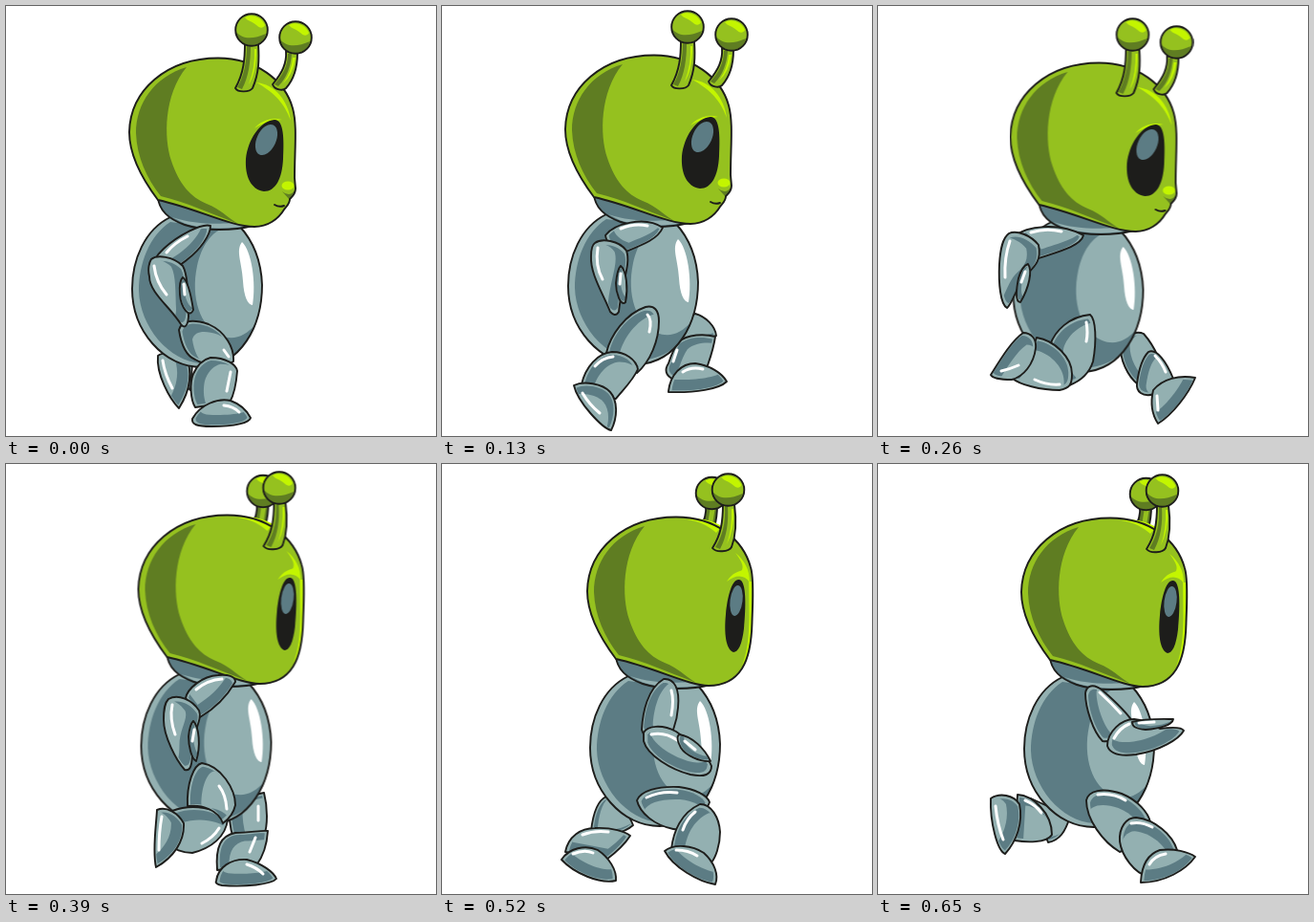
An HTML page that plays this animation: 450 px wide and 450 px high, repeating every 780 ms.

```html
<!DOCTYPE html>
<html lang="en">
<head>
<meta charset="utf-8">
<title>Walking alien</title>
<style>
html, body { margin: 0; width: 100%; height: 100%; overflow: hidden; background: #fff; }
svg { display: block; width: 100vw; height: 100vh; }
.ink { stroke: #1d1d1b; stroke-width: 1.9; stroke-linejoin: round; stroke-linecap: round; }
.none { fill: none; }
.green { fill: #95c11f; }
.moss { fill: #5f7d22; }
.lime { fill: #c3f500; }
.steel { fill: #93b0b1; }
.slate { fill: #5c7c84; }
.black { fill: #1d1d1b; }
.white { fill: #fff; }
.gloss { fill: none; stroke: #fff; stroke-width: 3; stroke-linecap: round; }
.pose { visibility: hidden; animation: pose 780ms step-end calc((var(--i) - 6) * 130ms) infinite; }
.face { visibility: hidden; animation: face 780ms step-end calc((var(--i) - 2) * 390ms) infinite; }
.bob { animation: bob 780ms step-end infinite; }
@keyframes pose { 0% { visibility: visible; } 16.6667%, 100% { visibility: hidden; } }
@keyframes face { 0% { visibility: visible; } 50%, 100% { visibility: hidden; } }
@keyframes bob {
  0%, 100% { transform: translate(0, 0); }
  16.6667% { transform: translate(0, -3px); }
  33.3333% { transform: translate(9.5px, 5px); }
  50% { transform: translate(9.5px, -1px); }
  66.6667% { transform: translate(23px, 1px); }
  83.3333% { transform: translate(21px, 2px); }
}
</style>
</head>
<body>
<svg viewBox="0 0 450 450">
  <defs>
    <g id="ball">
      <circle r="16.8" class="green"/>
      <path class="moss" d="M-16 2C-10 10 2 10 15 4C13 13 6 16 0 16C-8 16 -15 10 -16 2Z"/>
      <path class="lime" d="M-7 -13C0 -17 10 -14 14 -5C12 -1 8 -2 5 -5C1 -9 -4 -9 -7 -13Z"/>
      <circle r="16.8" class="ink none"/>
    </g>
    <path id="skull" d="M159 203C147 187 129 160 129 132C130 88 168 54.500 222 54.500C262 54.500 292 78 300 107C305 125 302 150 302 180L303 191C303 197 299 200 297 202C297 207 294 209 291 213C285 223 274 231 260 231C235 231 200 212 159 203Z"/>
    <path id="skull2" d="M159 203C147 187 129 160 129 132C130 88 168 54.500 222 54.500C264 54.500 292 78 300 107C304 120 302 145 301.500 165C301 185 298 202 291 213C284 224 272 231 256 231C235 231 200 212 159 203Z"/>
    <path id="shade" class="moss" d="M189 64C155 74 136 102 136 133C137 158 147 180 162 199C190 206 212 216 243 228C230 220 225 213 210 207C193 200 181 186 173 162C165 138 165 93 189 64Z"/>
  </defs>

  <g id="far">
    <g class="pose" style="--i:0">
      <path d="M176 340L197 345L193 402L182 392Z"/>
      <path d="M159 366C163 362 183 362 188 365C196 384 193 402 181 421C171 411 157 385 159 366Z" data-s="-11 -3" data-g="M164 371Q166 385 174 400"/>
    </g>
    <g class="pose" style="--i:1">
      <path d="M238 335L265 322C276 325 286 335 287 345C275 350 255 350 245 355Z"/>
      <path d="M247 352C257 343 275 343 286 346C284 360 280 370 277 379L243 391C233 387 233 380 237 374C240 365 243 358 247 352Z" data-s="8 5" data-g="M246 360L242 372"/>
      <path d="M237 403C239 386 250 374 265 374C280 376 293 384 298 393C290 401 265 405 237 404Z" data-s="2 -11" data-g="M252 383Q261 377 273 380"/>
    </g>
    <g class="pose" style="--i:2">
      <path d="M254 352C262 342 272 340 278 343C286 352 290 360 293 367C285 375 278 385 272 396C262 388 252 370 254 352Z" data-s="7 -3"/>
      <path d="M283 362C292 358 302 373 309 390L290 406C276 410 270 403 271 395C273 380 277 368 283 362Z" data-s="7 3" data-g="M290 366Q297 373 301 383"/>
      <path d="M288 402C298 390 315 386 332 389C325 406 308 428 293 437C287 428 285 415 288 402Z" data-s="-7 -7" data-g="M292 408L293 423"/>
    </g>
    <g class="pose" style="--i:3">
      <path d="M234 352L270 344C274 360 274 378 270 389L238 392C234 380 233 364 234 352Z" data-s="11 0" data-g="M264 358L264 373"/>
      <path d="M221 425C219 400 225 389 240 386C255 386 268 383 274 384C273 400 268 412 262 420Z" data-s="9 6" data-g="M261 391L255 406"/>
      <path d="M220 436C222 422 235 413 252 414C268 418 280 427 283 434C278 440 250 443 226 441C220 440 219 438 220 436Z" data-s="3 -11" data-g="M252 419Q262 422 269 429"/>
    </g>
    <g class="pose" style="--i:4">
      <path d="M156 384C158 366 163 352 172 348C185 355 195 365 200 378C190 387 170 390 156 390Z"/>
      <path d="M129 406C132 390 145 381 160 381C178 380 192 385 197 389C190 400 180 408 172 414Z" data-s="3 -9" data-g="M147 388Q160 383 174 385"/>
      <path d="M125 414C133 402 150 398 163 404C175 412 183 425 182 436C165 440 138 428 125 414Z" data-s="4 -10" data-g="M137 408Q149 403 158 407"/>
    </g>
    <g class="pose" style="--i:5">
      <path d="M160 350L201 369C196 385 190 394 178 396Z"/>
      <path d="M146 346C162 347 182 365 182 388C176 397 155 396 143 394Z" data-s="6 8" data-g="M154 352Q164 356 171 365"/>
      <path d="M118 350C127 344 142 346 148 356C152 375 145 395 133 408C125 405 117 375 118 350Z" data-s="-12 -3" data-g="M123 358Q125 378 131 393"/>
    </g>
  </g>

  <g class="bob">
    <path class="steel" d="M172 221C145 234 132 266 132 296C132 340 165 378 205 378C246 376 268 335 268 292C267 265 258 245 244 230Z"/>
    <path class="slate" d="M172 226C150 240 139 270 139 298C140 335 170 372 205 374C232 373 252 359 262 332C250 347 237 350 225 345C203 336 193 305 200 272C205 250 215 238 226 233Z"/>
    <path class="white" d="M247 247C257 256 262 290 258 313C253 313 249 304 248 288C247 268 240 256 247 247Z"/>
    <path class="ink none" d="M172 221C145 234 132 266 132 296C132 340 165 378 205 378C246 376 268 335 268 292C267 265 258 245 244 230"/>
    <path class="slate ink" d="M159 200C160 214 170 223 187 229C208 236 240 235 258 230L240 205Z"/>
    <path class="steel" d="M174 221C200 230 232 228 246 226L253 230C235 233.500 208 234 187 227.500Z"/>

    <g class="face" style="--i:0">
      <use href="#skull" class="green"/>
      <use href="#shade"/>
      <path class="lime" d="M262 80C281 82 295 98 298 120C291 101 281 91 262 80Z"/>
      <path class="lime" d="M260 128C267 120 278 116 289 119C278 120 269 122 260 128Z"/>
      <path class="black" d="M281 119C291 119 291 140 290 160C289 181 282 194 270 194C256 192 250 178 251 160C253 140 266 120 281 119Z"/>
      <ellipse class="slate" cx="272.500" cy="140" rx="10" ry="17" transform="rotate(25 272.500 140)"/>
      <path class="moss" d="M289 194Q297 201 303 192L297 203Z"/>
      <ellipse class="lime" cx="295" cy="188" rx="6.500" ry="4.500"/>
      <use href="#skull" class="ink none"/>
      <path class="ink none" d="M281 208Q286 211 291 209"/>
      <path class="green ink" d="M293 47C294 60 289 70 279 82C281 88 290 89 293 86C302 76 305 62 305 49Z"/>
      <path class="moss" d="M295 50C295 63 289 73 281 82L285 84C294 75 298 63 299 50Z"/>
      <path class="lime" d="M300 54Q299 68 290 81Q300 73 303 54Z"/>
      <use href="#ball" x="303" y="33"/>
      <path class="green ink" d="M250 38C250 55 249 70 240 86C243 91 255 90 258 86C265 70 265 55 264 40Z"/>
      <path class="moss" d="M252 42C252 58 249 74 242 85L247 87C254 74 256 58 256 42Z"/>
      <path class="lime" d="M260 45Q261 64 254 82Q262 70 262 45Z"/>
      <use href="#ball" x="257" y="25"/>
    </g>

    <g class="face" style="--i:1">
      <path class="moss ink" d="M253 42C254 52 251 58 248 65L262 65C265 55 265 50 265 42Z"/>
      <path class="green" d="M258 44L255 62L260 62L263 44Z"/>
      <use href="#ball" x="259.500" y="29.500"/>
      <use href="#skull2" class="green"/>
      <use href="#shade"/>
      <path class="lime" d="M233 57C248 59 257 65 264 71L270 64C258 57 245 55 233 57Z"/>
      <path class="lime" d="M275 122C281 112 288 112 291 110C293 105 290 100 284 92C294 100 299 110 299 123C293 114 284 115 275 122Z"/>
      <path class="lime" d="M298 122L301 122L300.500 165C300 185 297 200 291 210C297 195 298 180 298.500 160Z"/>
      <path class="black" d="M288 120C296 121 295 150 293 171C291 188 287 196 282 196C274 193 272 176 274 156C276 135 281 119 288 120Z"/>
      <ellipse class="slate" cx="285" cy="142" rx="6.500" ry="16" transform="rotate(7 285 142)"/>
      <use href="#skull2" class="ink none"/>
      <path class="green ink" d="M271 40C271 60 269 73 260 87C264 92 277 91 280 86C285 73 285 56 283 41Z"/>
      <path class="moss" d="M273 43C274 62 270 75 263 86L268 88C275 75 277 60 276 43Z"/>
      <path class="lime" d="M280 46Q281 66 275 83Q283 68 282 46Z"/>
      <use href="#ball" x="276.500" y="26"/>
    </g>
  </g>

  <g id="near">
    <g class="pose" style="--i:0">
      <path d="M181 339C184 328 197 328 212 333C230 341 239 358 238 372C228 379 208 376 198 370C188 366 183 352 181 339Z" data-s="10 8" data-g="M228 360L233 367"/>
      <path d="M214 368C230 368 241 375 242 382C241 395 238 408 234 415L198 420C193 412 192 395 196 385C200 376 206 370 214 368Z" data-s="10 3" data-g="M235 383L231 403"/>
      <path d="M195 432C203 417 222 410 235 413C246 417 253 425 256 431C255 436 240 440 215 440C200 440 194 438 195 432Z" data-s="4 -10" data-g="M228 418Q238 419 244 425"/>
      <path d="M214 230C205 227 180 240 165 254C153 265 150 275 153 285C165 280 180 274 190 265C203 255 214 240 214 230Z" data-s="-4 -8" data-g="M190 241Q176 248 168 258"/>
      <path d="M152 265C158 260 175 262 185 272C191 283 190 305 191 325C190 337 186 337 183 333C172 315 150 300 150 283C148 275 150 268 152 265Z" data-s="-10 -3" data-g="M155 272Q157 289 168 302"/>
      <path d="M185 284C191 288 194 305 196 318C192 328 183 315 182 302C181 290 183 286 185 284Z" data-g="M186 291L187 302"/>
    </g>
    <g class="pose" style="--i:1">
      <path d="M172 363C176 345 192 322 213 315C222 313 227 318 227 330C227 350 218 372 204 384C195 378 185 370 172 363Z" data-s="10 3" data-g="M215 323Q220 328 217 341"/>
      <path d="M146 396C150 378 163 363 178 362C192 362 203 370 205 380C200 392 188 403 182 411C175 412 160 402 146 396Z" data-s="8 7" data-g="M160 377Q168 368 179 367"/>
      <path d="M138 397C148 392 168 395 176 404C184 413 184 430 177 444C168 442 142 415 138 397Z" data-s="-5 8" data-g="M147 405Q154 417 165 426"/>
      <path d="M171 240C180 228 212 219 231 232C226 244 210 250 190 258C180 255 172 248 171 240Z" data-s="4 -8" data-g="M187 233Q201 227 215 230"/>
      <path d="M160 248C167 243 185 245 193 256C198 270 188 290 185 320C182 325 179 323 176 320C168 300 155 280 156 262C156 255 157 250 160 248Z" data-s="-10 -3" data-g="M163 253Q160 272 168 286"/>
      <path d="M187 272C193 277 195 295 192 310C187 315 182 300 182 290C183 280 185 274 187 272Z" data-g="M187 280L186 291"/>
    </g>
    <g class="pose" style="--i:2">
      <path d="M180 355C185 340 200 325 222 323C228 328 229 350 225 372C220 388 208 394 200 397C190 385 177 372 180 355Z" data-s="11 2" data-g="M218 331Q220 342 218 351"/>
      <path d="M166 347C185 350 203 368 203 385C203 396 201 400 190 402C170 402 148 396 141 390C155 377 160 365 166 347Z" data-s="-4 9" data-g="M164 391Q177 397 190 396"/>
      <path d="M118 386C128 370 140 350 152 342C160 342 166 348 165 358C163 375 152 388 140 391C130 391 120 390 118 386Z" data-s="5 9" data-g="M129 382Q138 380 147 376"/>
      <path d="M143 241C155 230 190 226 215 240C212 252 185 258 165 265Z" data-s="4 -8" data-g="M160 237Q176 232 192 236"/>
      <path d="M137 238C145 234 160 240 168 250C172 270 160 275 152 285C145 295 140 312 135 316C128 312 126 290 127 270C128 255 130 243 137 238Z" data-s="-10 0" data-g="M138 246Q132 263 133 284"/>
      <path d="M157 270C162 277 158 295 149 310C143 310 145 295 147 285C150 275 154 271 157 270Z" data-g="M154 278L150 289"/>
    </g>
    <g class="pose" style="--i:3">
      <path d="M174 363C195 355 222 360 232 372C230 390 215 402 195 407C185 407 175 403 170 398Z" data-s="6 10" data-g="M205 397Q217 391 223 381"/>
      <path d="M190 358C189 335 196 315 205 313C225 316 240 340 240 357C238 366 234 371 227 376C222 362 205 356 190 358Z" data-s="11 4" data-g="M223 337Q230 346 231 361"/>
      <path d="M158 362C168 358 180 365 186 376C187 395 175 412 157 422C153 405 157 380 158 362Z" data-s="-11 -3" data-g="M163 369Q160 385 160 404"/>
      <path d="M188 245C190 235 205 222 222 221C232 220 240 222 240 228C230 245 215 258 203 265Z" data-s="-4 -10" data-g="M199 236Q211 226 226 225"/>
      <path d="M170 246C180 240 195 247 202 258C206 268 195 280 195 300C195 315 193 322 187 320C178 310 165 285 165 268C165 256 166 250 170 246Z" data-s="-12 -3" data-g="M174 252Q171 267 177 283"/>
      <path d="M196 269C202 275 204 295 199 311C194 308 191 295 191 285C192 276 194 271 196 269Z" data-g="M197 278L195 290"/>
    </g>
    <g class="pose" style="--i:4">
      <path d="M204 352C208 342 225 337 248 338C265 340 278 347 280 354C275 368 258 385 242 382C222 378 207 365 204 352Z" data-s="2 10" data-g="M214 349Q229 342 246 344"/>
      <path d="M240 403C242 385 250 365 270 356C282 356 290 370 291 385C291 400 286 412 282 417C270 410 255 402 240 403Z" data-s="10 5" data-g="M252 383Q256 371 265 364"/>
      <path d="M233 405C243 397 262 399 274 407C285 417 290 430 286 440C268 437 242 422 233 405Z" data-s="4 -10" data-g="M245 404Q258 404 267 410"/>
      <path d="M209 278C210 260 215 235 232 225C243 224 249 235 247 255C246 270 240 285 235 292C222 295 212 288 209 278Z" data-s="9 -2" data-g="M240 237Q243 247 240 263"/>
      <path d="M211 281C215 274 230 272 245 280C262 292 278 305 282 316C282 325 275 328 260 325C240 320 215 305 211 290Z" data-s="2 -10" data-g="M219 283Q233 280 246 289"/>
      <path d="M248 283C262 285 275 298 281 311C270 312 255 305 250 297C246 290 246 285 248 283Z" data-g="M254 290L265 299"/>
    </g>
    <g class="pose" style="--i:5">
      <path d="M218 352C220 342 235 338 255 345C272 352 283 365 285 375C275 390 262 403 253 406C235 395 218 372 218 352Z" data-s="-3 11" data-g="M230 346Q246 344 259 352"/>
      <path d="M253 395C252 380 260 370 270 370C290 372 308 388 313 404L283 432C268 428 255 410 253 395Z" data-s="-3 10" data-g="M265 376Q276 374 287 380"/>
      <path d="M275 437C276 420 283 408 295 404C310 402 325 406 332 411C322 425 300 438 275 438Z" data-s="1 -11" data-g="M284 419Q289 410 301 408"/>
      <path d="M217 240C218 232 225 229 235 237C250 250 262 262 268 272C258 282 245 292 235 290C225 280 217 255 217 240Z" data-s="8 -4" data-g="M232 239Q244 250 254 261"/>
      <path d="M240 295C240 280 255 267 268 267C280 268 285 272 295 277C310 275 318 276 320 279C315 288 295 300 270 304C255 306 243 304 240 295Z" data-s="-4 -11" data-g="M247 287Q253 276 263 272"/>
      <path d="M266 270C280 266 300 267 309 267C308 273 295 277 280 278C270 277 266 275 266 270Z" data-g="M273 271L289 270"/>
    </g>
  </g>
</svg>
<script>
// Turns each limb outline into a metal plate: light rim, dark core, lit side.
const svgNS = "http://www.w3.org/2000/svg";

function inset(box, k, dx, dy) {
  const cx = box.x + box.width / 2, cy = box.y + box.height / 2;
  return `translate(${cx + dx} ${cy + dy}) scale(${k}) translate(${-cx} ${-cy})`;
}

document.querySelectorAll(".pose path").forEach((path, n) => {
  const d = path.getAttribute("d"), box = path.getBBox();
  const [dx, dy] = (path.dataset.s || "4 -3").split(" ").map(Number);
  const plate = document.createElementNS(svgNS, "g");
  plate.innerHTML = `
    <clipPath id="plate${n}"><path d="${d}"/></clipPath>
    <g clip-path="url(#plate${n})">
      <path class="steel" d="${d}"/>
      <path class="slate" d="${d}" transform="${inset(box, 0.88, 0, 0)}"/>
      <path class="steel" d="${d}" transform="${inset(box, 0.86, dx, dy)}"/>
      <path class="gloss" d="${path.dataset.g || ""}"/>
    </g>
    <path class="ink none" d="${d}"/>`;
  path.replaceWith(plate);
});
</script>
</body>
</html>
```
